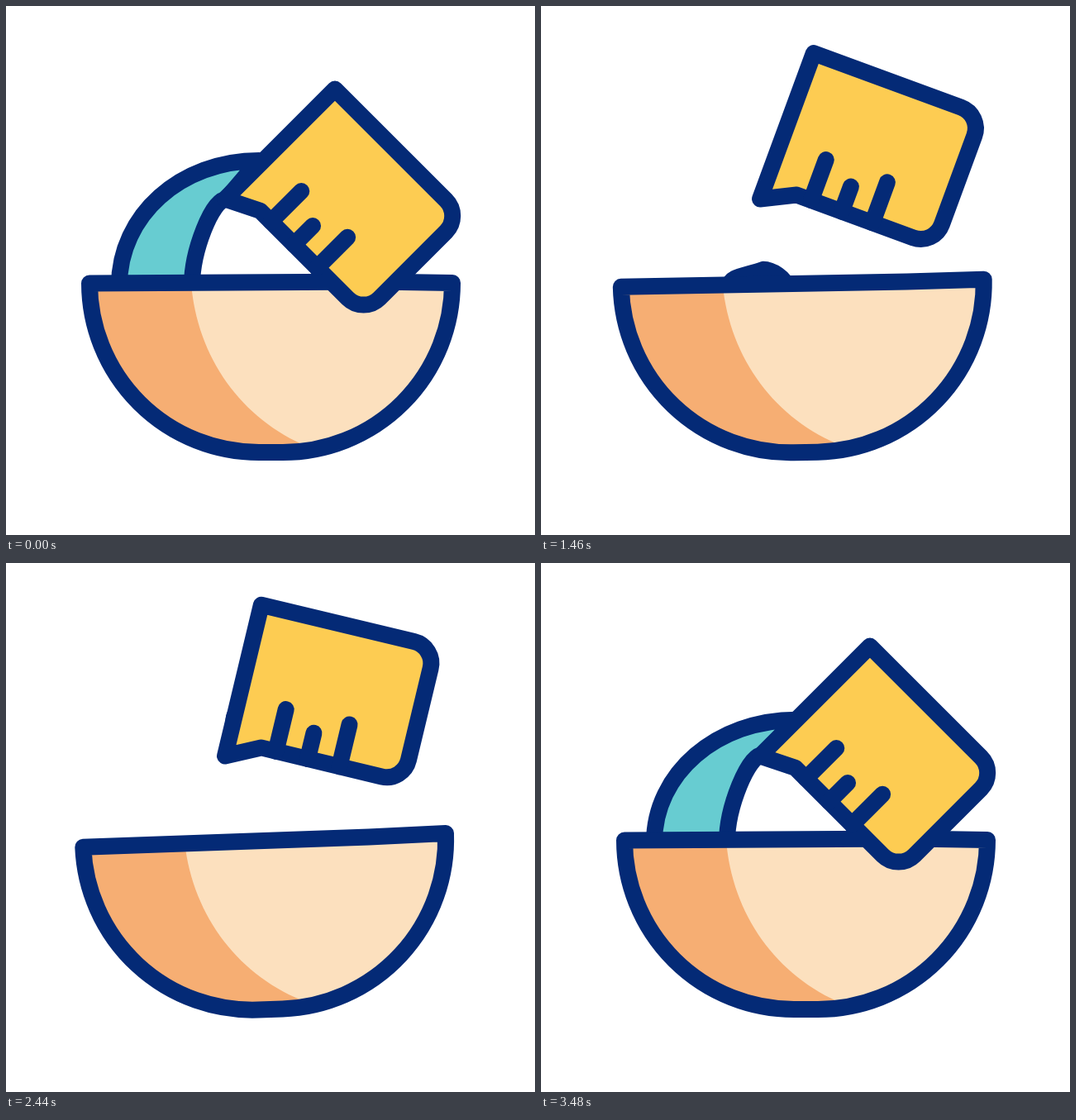
These frames come from a looping animation (640 by 640 pixels, 3540 ms). An HTML page with a canvas:

```html
<!DOCTYPE html>
<html lang="en">
<head>
<meta charset="utf-8">
<title>Pouring into a bowl</title>
<style>
  html, body { margin: 0; width: 100%; height: 100%; overflow: hidden; background: #fff; }
  canvas { display: block; width: 640px; height: 640px; }
</style>
</head>
<body>
<canvas id="stage" width="640" height="640"></canvas>
<script>
const ctx = document.getElementById('stage').getContext('2d');
const LOOP = 3540;
const NAVY = '#042a76', YELLOW = '#fdcc52', TEAL = '#67ccd1', PEACH = '#fce0be', ORANGE = '#f6ae73';
const lip = { x: 265, y: 233.5 };

const mix = (a, b, k) => a + (b - a) * k;
const linear = (t, from, to) => Math.min(1, Math.max(0, (t - from) / (to - from)));
const ramp = (t, from, to) => {
  const k = linear(t, from, to);
  return k * k * (3 - 2 * k);
};
const radians = degrees => degrees * Math.PI / 180;

// Tilt back, sway forward and back, then pour with a small overshoot
const cupTilt = t => radians(45
  - 36.2 * ramp(t, 180, 1030) + 26.2 * ramp(t, 1210, 1760)
  - 21.5 * ramp(t, 1760, 2320) + 42.5 * ramp(t, 2840, 3400) - 11 * ramp(t, 3400, 3480));

const bowlTilt = t => radians(
  2 * (ramp(t, 410, 890) - ramp(t, 1210, 1760)) + 2.1 * (ramp(t, 1760, 2320) - ramp(t, 2820, 3400)));

function paint(path, fill) {
  ctx.fillStyle = fill;
  ctx.fill(path);
  ctx.stroke(path);
}

// Two quarter ellipses: outer edge rising to the top, inner edge falling from the lip
function drawStream({ left, right, foot = 338, topX, topY, lipX, lipY, droop = 0 }) {
  const path = new Path2D();
  path.moveTo(left, foot);
  path.bezierCurveTo(left, mix(foot, topY, 0.56), mix(topX, left, 0.56), topY + droop, topX, topY);
  path.lineTo(lipX, lipY);
  path.bezierCurveTo(mix(lipX, right, 0.4), lipY, right, mix(foot, lipY, 0.4), right, foot);
  paint(path, TEAL);
}

function drawFall(t) {
  const slip = linear(t, 200, 600) ** 1.5;
  const detach = linear(t, 600, 920);
  const sink = linear(t, 920, 1560);
  drawStream({
    left: 137 + 37 * slip + 19 * detach + 42 * sink,
    right: 225 + 30 * slip + 31 * detach + 12 * sink,
    topX: 306 - 40 * slip - 4 * detach + 8 * sink,
    topY: 187 + 34 * slip + 26 * detach + 85 * sink,
    lipX: 266 - 4 * slip + 8 * sink,
    lipY: 234 - 2 * slip + 15 * detach + 85 * sink,
    droop: 8 * detach
  });
}

function drawPour(t, tilt) {
  const grow = linear(t, 2400, 2920);
  const widen = ramp(t, 2920, 3400);
  const reach = 50 + 12 * widen;
  drawStream({
    left: mix(285, 154, grow) - 17 * widen,
    right: mix(290, 176, grow) + 49 * widen,
    foot: mix(200, 338, grow),
    topX: lip.x + reach * Math.sin(tilt),
    topY: lip.y - reach * Math.cos(tilt),
    lipX: 268,
    lipY: 232
  });
}

function drawSplashes(t) {
  const head = mix(-24, 18, ramp(t, 1850, 2110));
  const tail = mix(-24, 18, ramp(t, 1930, 2180));
  if (head - tail < 0.5) return;
  ctx.save();
  ctx.strokeStyle = YELLOW;
  ctx.lineWidth = Math.min(20, 2 * (head - tail));
  for (const side of [-1, 0, 1]) {
    ctx.save();
    ctx.translate(238 + 68 * side, 279 + 13 * Math.abs(side));
    ctx.rotate(radians(26 * side));
    ctx.beginPath();
    ctx.moveTo(0, -tail);
    ctx.lineTo(0, -head);
    ctx.stroke();
    ctx.restore();
  }
  ctx.restore();
}

function drawBowl(tilt) {
  const rimY = 333.5 + 2.5 * Math.min(1, tilt / 0.0105);
  const hull = 'A205 205 0 0 1 101 335.5';
  ctx.save();
  ctx.translate(320, 550);
  ctx.rotate(-tilt);
  ctx.translate(-320, -550);
  const bowl = new Path2D(`M101 335.5L447 ${rimY}L540 335A205 205 0 0 1 335 540H306${hull}Z`);
  ctx.fillStyle = PEACH;
  ctx.fill(bowl);
  ctx.fillStyle = ORANGE;
  ctx.fill(new Path2D(`M224 335C231 425 285 500 365 533L335 540H306${hull}Z`));
  ctx.stroke(bowl);
  ctx.restore();
}

const cup = new Path2D('M0 0V-188H190A27 27 0 0 1 217 -161V-47A27 27 0 0 1 190 -20H40Z');
const marks = new Path2D('M58.5 -20V-72M98 -20V-52M137.5 -20V-72');

function drawCup(tilt) {
  ctx.save();
  ctx.translate(lip.x, lip.y);
  ctx.rotate(tilt);
  paint(cup, YELLOW);
  ctx.stroke(marks);
  ctx.restore();
}

function draw(t) {
  const tilt = cupTilt(t);
  ctx.fillStyle = '#fff';
  ctx.fillRect(0, 0, 640, 640);
  ctx.strokeStyle = NAVY;
  ctx.lineWidth = 20;
  ctx.lineCap = ctx.lineJoin = 'round';
  if (t < 1560) drawFall(t);
  else if (t > 2400) drawPour(t, tilt);
  drawSplashes(t);
  drawBowl(bowlTilt(t));
  drawCup(tilt);
}

const start = performance.now();
function tick() {
  draw((performance.now() - start) % LOOP);
  requestAnimationFrame(tick);
}
tick();
</script>
</body>
</html>
```
